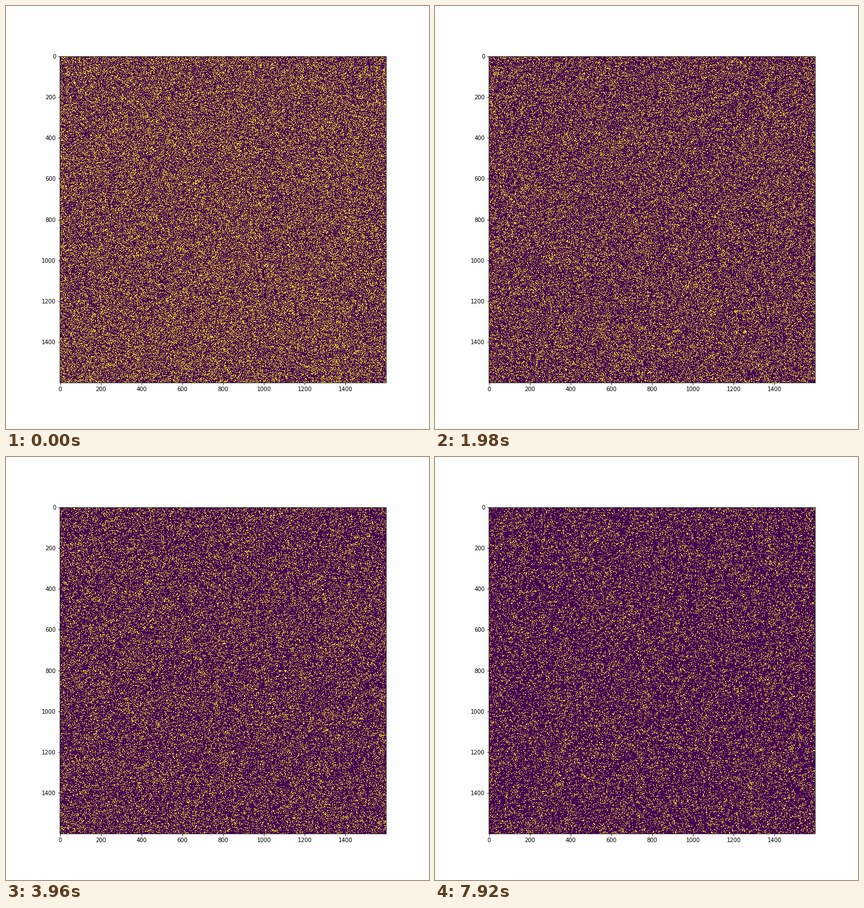
These frames come from a looping animation (748x748 px, 8000 ms). A matplotlib script:

```python
import numpy as np
import matplotlib.pyplot as plt
from matplotlib.animation import FuncAnimation

SIZE, DPI = 748, 72  # stage, px
CELLS = 1600         # grid side
LEFT, BOTTOM, SIDE = 95.47, 82.37, 576.58   # plot box, px
VIEW = round(SIDE)
LOOP, TICK, STEP = 8000, 40, 330            # ms


def step(grid):
    """One generation of Conway's Life on a torus."""
    pad = np.pad(grid, 1, mode="wrap")
    rows = pad[:-2] + pad[1:-1] + pad[2:]
    total = rows[:, :-2] + rows[:, 1:-1] + rows[:, 2:]
    return ((total == 3) | ((total == 4) & (grid == 1))).astype(np.uint8)


def history(count):
    """Generations of a random soup, sampled at the centre of each screen pixel."""
    rng = np.random.default_rng(7)
    grid = rng.integers(0, 2, (CELLS, CELLS), dtype=np.uint8)
    pick = ((np.arange(VIEW) + 0.5) * CELLS / VIEW).astype(int)
    views = []
    for _ in range(count):
        grid = step(grid)
        views.append(grid[np.ix_(pick, pick)])
    return views


views = history(LOOP // STEP + 1)

fig = plt.figure(figsize=(SIZE / DPI, SIZE / DPI), dpi=DPI, facecolor="#fefefe")
ax = fig.add_axes([v / SIZE for v in (LEFT, BOTTOM, SIDE, SIDE)])
edge = CELLS - 0.5
image = ax.imshow(views[0], cmap="viridis", vmin=0, vmax=1,
                  interpolation="nearest", extent=(-0.5, edge, edge, -0.5))
ax.set_xticks(range(0, CELLS, 200))
ax.set_yticks(range(0, CELLS, 200))


def update(frame):
    image.set_data(views[frame * TICK // STEP])
    return (image,)


anim = FuncAnimation(fig, update, frames=LOOP // TICK, interval=TICK,
                     repeat=True, repeat_delay=0)
plt.show()
```
